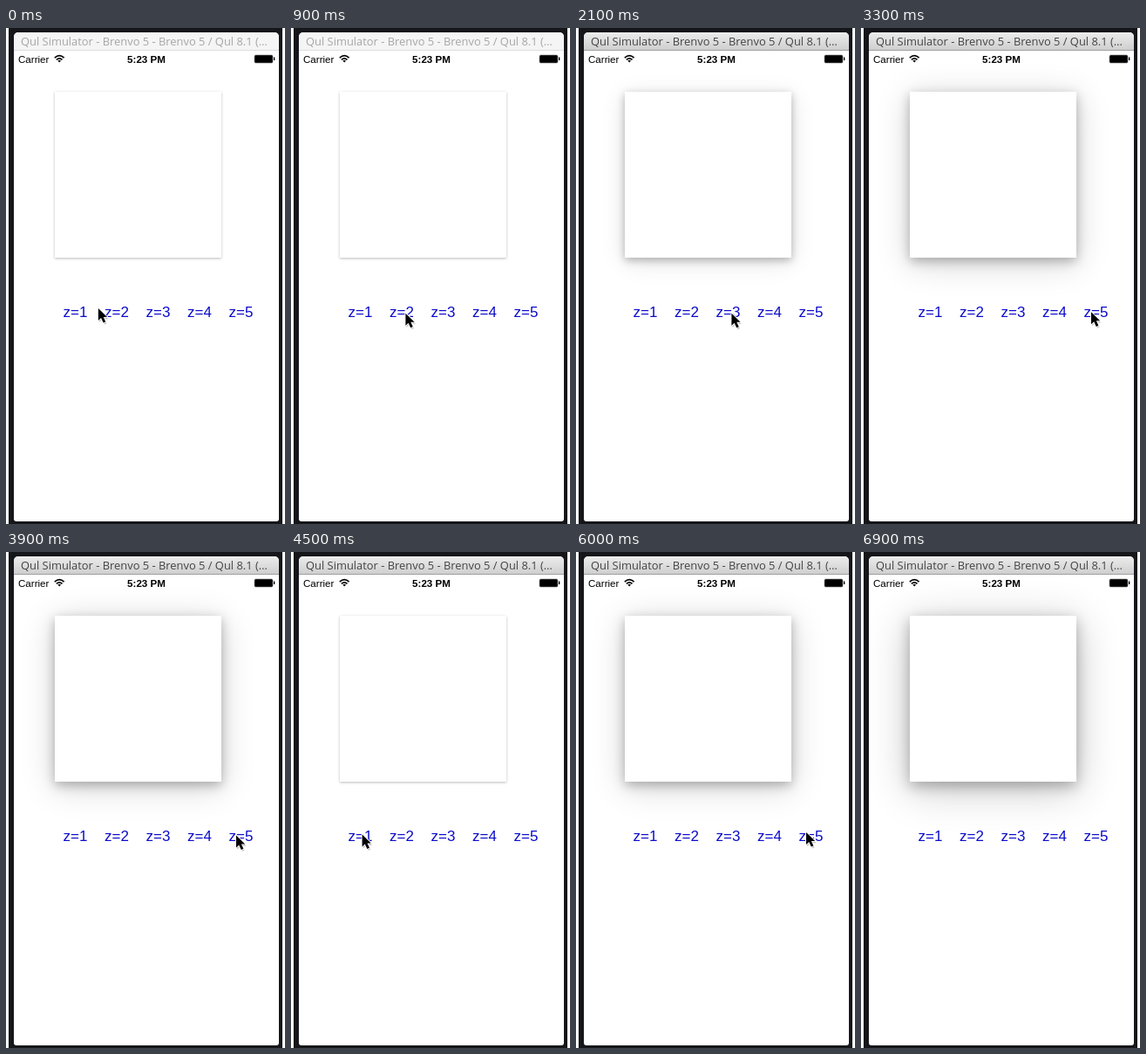
These frames come from a looping animation (320 px wide and 568 px high, 7200 ms). An HTML page:

```html
<!DOCTYPE html>
<html lang="en">
<head>
<meta charset="utf-8">
<title>Shadow depth demo</title>
<style>
  html, body { margin: 0; width: 100%; height: 100%; overflow: hidden; background: #fff; }
  #stage { position: relative; width: 320px; height: 568px; overflow: hidden; }
  #backdrop { position: absolute; left: 3px; top: 0; width: 314px; height: 568px; background: #15161a; }
  #window {
    position: absolute; left: 9px; top: 5px; width: 304px; height: 560px;
    border-radius: 5px 5px 3px 3px; background: #fff; overflow: hidden;
  }
  #bar { height: 20px; background: #f5f5f5; border-bottom: 1px solid #dedede; }
  .active #bar { background: linear-gradient(#ececec, #cfcfcf); border-color: #a0a0a0; }
  #card { position: absolute; left: 47px; top: 68px; width: 191px; height: 190px; background: #fff; }
  svg { position: absolute; left: 0; top: 0; }
  text { font-family: "Liberation Sans", Arial, sans-serif; }
  #title { font: 12.9px "Open Sans", sans-serif; fill: #a6a6a6; }
  .active #title { fill: #444; }
  .status { font-size: 11.6px; }
  .button { font-size: 17px; fill: #0c0ccb; }
</style>
</head>
<body>
<div id="stage">
  <div id="backdrop"></div>
  <div id="window"><div id="bar"></div><div id="card"></div></div>
  <svg width="320" height="568">
    <text id="title" x="17" y="20">Qul Simulator - Brenvo 5 - Brenvo 5 / Qul 8.1 (…</text>
    <text class="status" x="14" y="39.5">Carrier</text>
    <text class="status" x="161" y="39.5" text-anchor="middle" font-weight="bold">5:23 PM</text>
    <g fill="none" stroke="#000" stroke-width="1.7">
      <path d="M55.8 34.2Q61.2 29.2 66.6 34.2M57.9 36.4Q61.2 33.4 64.5 36.4"/>
      <path d="M59.4 37.5Q61.2 36 63 37.5L61.2 39.5Z" fill="#000" stroke="none"/>
    </g>
    <rect x="285" y="31" width="21" height="9" rx="1.5" stroke="#777" stroke-width=".6"/>
    <rect x="307" y="33.5" width="1.3" height="3.5"/>
    <g id="buttons"></g>
    <g id="cursor">
      <path d="M1 2V16L4.3 13L7 18.4L9.6 17.2L7.2 12.2H11.5Z" opacity=".25"/>
      <path d="M0 0V14L3.2 11L5.8 16.6L8.4 15.4L5.9 10H10.2Z" stroke="#fff" stroke-width="1.8" paint-order="stroke"/>
    </g>
  </svg>
</div>
<script>
const LOOP = 7200, STEP = 300, ACTIVATED = 1200, CURSOR_HIDDEN = 6600, PRESS_DELAY = 300;
const $ = id => document.getElementById(id);

// Stops of the pointer: time, button it rests on, depth it then sets.
const stops = [
  [0, 1.48, 1], [600, 1, 1], [900, 2, 2], [1500, 3, 3], [2400, 4, 4],
  [3000, 5, 4], [4200, 1, 1], [4800, 4, 4], [6000, 5, 5]
];
const stopAt = t => stops.findLast(([start]) => start <= Math.max(t, 0));

// The pointer aims a little shorter on each further button and sweeps a shallow arc.
const pointerX = button => 29 + 54 * button - 1.4 * button ** 2;
const pointerY = t => 321 + 6 * Math.sin(Math.PI * Math.sqrt(Math.min(t / 6000, 1)));

// A tight shadow that grows with depth, plus a wide halo that also darkens.
const shadow = z =>
  `0 ${z}px ${3 * z}px rgba(0,0,0,.27), 0 ${1.6 * z}px ${9 * z}px rgba(0,0,0,${.06 * (z - 1)})`;

for (let z = 1; z <= 5; z++) {
  $("buttons").innerHTML += `<text class="button" x="${18 + 47.5 * z}" y="331">z=${z}</text>`;
}

function draw(now) {
  const t = Math.floor(now % LOOP / STEP) * STEP;
  const [, button] = stopAt(t);
  const [, , depth] = stopAt(t - PRESS_DELAY);
  $("stage").classList.toggle("active", t >= ACTIVATED);
  $("card").style.boxShadow = shadow(depth);
  $("cursor").setAttribute("transform", `translate(${pointerX(button)} ${pointerY(t)})`);
  $("cursor").setAttribute("visibility", t < CURSOR_HIDDEN ? "visible" : "hidden");
}

function tick() {
  draw(performance.now());
  requestAnimationFrame(tick);
}
tick();
</script>
</body>
</html>
```
